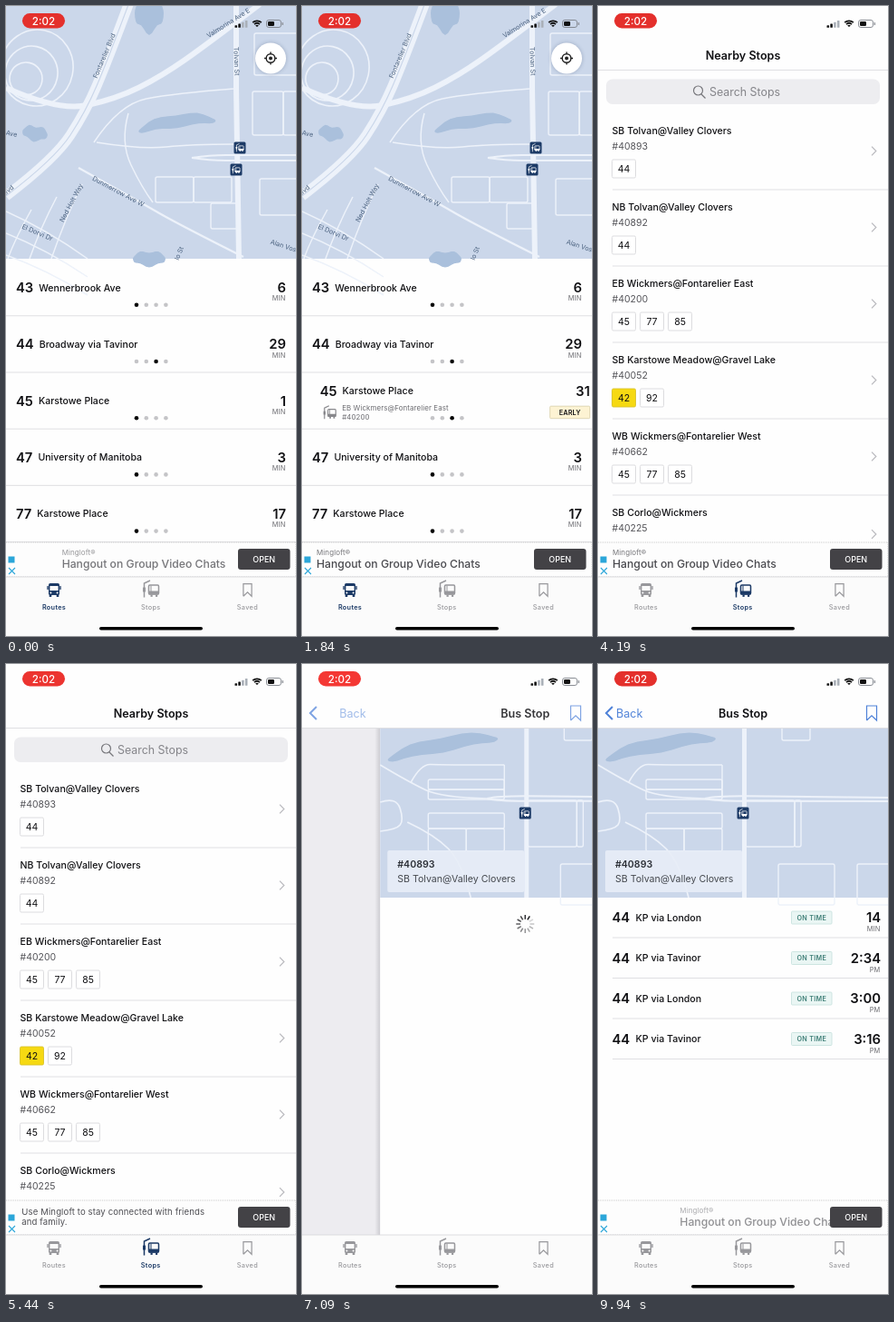
These frames come from a looping animation (320x693 px, 9990 ms). An HTML page with a canvas:

```html
<!DOCTYPE html>
<html lang="en">
<head>
<meta charset="utf-8">
<title>Transit app</title>
<style>
  html, body { margin: 0; width: 100%; height: 100%; overflow: hidden; background: #fff; }
  canvas { display: block; width: 320px; height: 693px; }
</style>
</head>
<body>
<canvas id="stage"></canvas>
<script>
const W = 320, H = 693, LOOP = 9990;
const canvas = document.getElementById('stage');
const g = canvas.getContext('2d');
const dpr = window.devicePixelRatio || 1;
canvas.width = W * dpr;
canvas.height = H * dpr;

const INK = '#111114', GREY = '#6b6b70', NAVY = '#1c3a66', BLUE = '#4f82d8', LINE = '#dcdcdf';
const LAND = '#cbd7ea', ROAD = '#edf2fa', WATER = '#aac0dc', MAPTEXT = '#4a617f';

const clamp = v => Math.max(0, Math.min(1, v));
const span = (t, a, b) => clamp((t - a) / (b - a));
const easeOut = p => 1 - (1 - p) ** 3;
const smooth = p => p * p * (3 - 2 * p);

// ---- drawing helpers ----
function text(s, x, y, size, { weight = 400, color = INK, align = 'left', space = 0 } = {}) {
  g.font = `${weight} ${size}px Inter, sans-serif`;
  g.letterSpacing = space + 'px';
  g.textAlign = align;
  g.textBaseline = 'alphabetic';
  g.fillStyle = color;
  g.fillText(s, x, y + size * 0.364);
  return g.measureText(s).width;
}

function box(x, y, w, h, r, fill, stroke, lw = 1) {
  g.beginPath();
  g.roundRect(x, y, w, h, r);
  if (fill) { g.fillStyle = fill; g.fill(); }
  if (stroke) { g.strokeStyle = stroke; g.lineWidth = lw; g.stroke(); }
}

function line(points, color, lw) {
  g.beginPath();
  for (let i = 0; i < points.length; i += 2) g.lineTo(points[i], points[i + 1]);
  g.strokeStyle = color;
  g.lineWidth = lw;
  g.stroke();
}

function circle(x, y, r, fill, stroke, lw) {
  g.beginPath();
  g.arc(x, y, r, 0, 7);
  if (fill) { g.fillStyle = fill; g.fill(); }
  if (stroke) { g.strokeStyle = stroke; g.lineWidth = lw; g.stroke(); }
}

function layer(draw, { x = 0, y = 0, alpha = 1, turn = 0, scale = 1, clip } = {}) {
  g.save();
  if (clip) { g.beginPath(); g.rect(...clip); g.clip(); }
  g.translate(x, y);
  g.rotate(turn * Math.PI / 180);
  g.scale(scale, scale);
  g.globalAlpha *= alpha;
  draw();
  g.restore();
}

// ---- icons ----
function busIcon(x, y, color) {
  layer(() => {
    box(-6, -7, 12, 13, 1.8, color);
    box(-4.6, -4, 9.2, 5, .5, '#fbfbfb');
    for (const side of [-1, 1]) {
      box(side * 7 - .7, -4, 1.4, 4, .5, color);
      box(side * 4 - 1.3, 5, 2.6, 3, .5, color);
      circle(side * 3.6, 3.4, 1, '#fbfbfb');
    }
  }, { x, y });
}

function stopIcon(x, y, color, scale = 1) {
  layer(() => {
    line([-7.5, 9, -7.5, -6.5, -1, -9.5], color, 1.5);
    box(-9, -2, 3, 5, .5, color);
    box(-2.5, -4.5, 11, 10, 1.2, null, color, 1.5);
    box(-2.5, 2, 11, 4, .5, color);
    line([0, -4, 0, 3], color, 1);
    for (const wheel of [-.5, 5]) box(wheel, 6, 2.2, 2.4, 0, color);
  }, { x, y, scale });
}

function bookmark(x, y, w, h, color) {
  line([x - w, y + h, x - w, y - h, x + w, y - h, x + w, y + h, x, y + h * .35, x - w, y + h], color, 1.2);
}

function chevron(x, y, dir, s, color, lw) {
  line([x, y - s, x + dir * s, y, x, y + s], color, lw);
}

// ---- map helpers ----
// Smooth road through the midpoints of a few key points.
function road(p, lw, color = ROAD) {
  g.beginPath();
  g.moveTo(p[0], p[1]);
  for (let i = 2; i < p.length - 2; i += 2) {
    const k = i < p.length - 4 ? .5 : 1;
    g.quadraticCurveTo(p[i], p[i + 1], p[i] + (p[i + 2] - p[i]) * k, p[i + 1] + (p[i + 3] - p[i + 1]) * k);
  }
  g.strokeStyle = color;
  g.lineWidth = lw;
  g.stroke();
}

// Bent lake: a lens along a shallow arc with a slightly uneven shore.
function lake(x, y, length, width, turn, bend = 0) {
  layer(() => {
    g.beginPath();
    for (let i = 0; i < 32; i++) {
      const a = i * Math.PI / 16, u = Math.cos(a);
      g.lineTo(u * length, Math.sin(a) * width * (1 + .2 * Math.sin(a * 5)) + bend * u * u);
    }
    g.fillStyle = WATER;
    g.fill();
  }, { x, y, turn });
}

// Rows of blocks sharing their sides.
function blocks(x, y, w, h, cols, rows) {
  for (let i = 0; i < cols * rows; i++)
    box(x + (i % cols) * w, y + Math.floor(i / cols) * h, w, h, 2, null, ROAD, 1.4);
}

function mapLabel(s, x, y, turn, size = 7.2) {
  layer(() => text(s, 0, 0, size, { color: MAPTEXT }), { x, y, turn });
}

function mapStop(x, y) {
  box(x - 6.5, y - 6.5, 13, 13, 1.5, NAVY);
  stopIcon(x, y, '#fff', .48);
}

// ---- shared chrome ----
function statusBar(t) {
  const pulse = Math.round(2 - 2 * Math.cos(t / 1000 * Math.PI)) / 4;
  box(18, 8, 47, 16.5, 8.2, `rgb(${228 + 16 * pulse},${48 + 8 * pulse},${44 + 8 * pulse})`);
  text('2:02', 41.5, 16.3, 11.6, { weight: 500, color: '#fff', align: 'center' });
  for (let i = 0; i < 4; i++) box(252.5 + i * 3.8, 21.3 - i * 1.8, 2.6, 2.5 + i * 1.8, .6, i < 2 ? '#111' : '#aab0b8');
  for (let i = 0; i < 3; i++) {
    g.beginPath();
    g.arc(277, 23.5, 1.8 + i * 2.7, -2.3, -.84);
    g.strokeStyle = '#111';
    g.lineWidth = 1.8;
    g.stroke();
  }
  box(287.5, 15.5, 16, 8, 2.4, null, '#7c8088', .9);
  box(289, 17, 7, 5, 1.2, '#111');
  box(304.7, 18, 1.3, 3, .6, '#8a8e95');
}

function tabBar(active) {
  g.fillStyle = '#fbfbfb';
  g.fillRect(0, 628, W, 65);
  line([0, 628, W, 628], '#d5d5d8', .8);
  const tint = i => i === active ? NAVY : '#98989c';
  busIcon(53, 642, tint(0));
  stopIcon(160, 641.5, tint(1));
  bookmark(266.5, 642.5, 4.6, 6.8, tint(2));
  ['Routes', 'Stops', 'Saved'].forEach((s, i) =>
    text(s, 53 + i * 106.7, 661, 7.3, { weight: i === active ? 600 : 500, color: tint(i), align: 'center', space: .3 }));
  box(103, 683, 114, 3.6, 1.8, '#000');
}

// ---- banner: the two messages swap every five seconds ----
function bannerText(which, x) {
  if (which === 0) {
    text('Mingloft®', x, 601, 8, { color: '#77777b', space: .1 });
    text('Hangout on Group Video Chats', x, 614, 12.2, { weight: 500, color: '#4a4a4f' });
  } else {
    text('Use Mingloft to stay connected with friends', x, 603, 9.6, { color: '#4d4d52', space: .1 });
    text('and family.', x, 614, 9.6, { color: '#4d4d52', space: .1 });
  }
}

function banner(t) {
  g.fillStyle = '#fdfdfd';
  g.fillRect(0, 590, W, 38);
  g.setLineDash([1, 1]);
  line([0, 590, W, 590, W, 628, 0, 628], '#bbb', .8);
  g.setLineDash([]);
  const phase = (t + 150) % 5000;
  const which = Math.floor((t + 150) / 5000) % 2;
  const leave = span(phase, 4850, 5000);
  const enter = 46 * Math.exp((150 - phase) / 123);
  const alpha = (1 - leave) * clamp(1 - enter / 190);
  layer(() => bannerText(which, 16 + enter - 120 * leave ** 2), { alpha, clip: [12, 591, 308, 36] });
  box(2.5, 605.5, 7, 7, 0, '#2ba6d9');
  for (const s of [-1, 1]) line([6.5 - 3.5 * s, 618, 6.5 + 3.5 * s, 625], '#2ba6d9', 1.1);
  box(256, 597, 57.5, 23, 3, '#434246');
  text('OPEN', 284.7, 608.3, 9, { weight: 500, color: '#fff', align: 'center' });
}

// ---- routes screen ----
function cityMap() {
  g.fillStyle = LAND;
  g.fillRect(0, 0, W, 278);
  lake(158, 8, 16, 20, 0);
  lake(188, 126, 43, 7, -8, 6);
  lake(32, 140, 14, 8, 10);
  lake(158, 278, 18, 8, 0);

  // interchange ramps
  for (let i = 0; i < 3; i++) {
    g.beginPath();
    g.ellipse(34 - i * 6, 68 + i * 6, 40 - i * 11, 42 - i * 12, .2, 0, 7);
    g.strokeStyle = ROAD;
    g.lineWidth = 1.6;
    g.stroke();
  }
  // side streets south of the main road
  for (let i = 0; i < 3; i++) {
    road([84 - i * 28, 196 + i * 14, 66 - i * 28, 232 + i * 12, 50 - i * 24, 278], 1.5);
    road([0, 226 + i * 24, 45, 246 + i * 22, 90, 278 + i * 20], 1.5);
  }
  // neighbourhood crescents
  road([97, 150, 125, 108, 185, 96, 252, 91], 1.5);
  road([100, 150, 150, 158, 204, 152, 252, 152], 1.5);
  road([135, 118, 126, 150, 150, 200, 162, 216], 1.5);
  blocks(165, 188, 42, 28, 2, 1);
  blocks(272, 94, 34, 48, 2, 1);
  blocks(280, 190, 60, 40, 1, 1);
  blocks(274, 30, 60, 46, 1, 1);
  blocks(226, 217, 30, 28, 1, 1);

  road([80, 178, 145, 214, 190, 240, 262, 276], 2.2);
  for (const side of [-1, 1]) road([205, 167, 225, 167 + side * 3, 260, 167 + side * 3, W, 167 + side * 3], 2);
  road([0, 90, 58, 116, 122, 102, 172, 77, 222, 42, 280, -2], 6);
  const avenue = [136, -4, 112, 60, 88, 116, 54, 168, 0, 209];
  road(avenue, 11);
  road(avenue, 1.2, LAND);
  line([254, 0, 254, 90, 257, 278], ROAD, 6);

  mapLabel('Fontarelier Blvd', 98, 79, -67);
  mapLabel('Valmorina Ave E', 222, 33, -32);
  mapLabel('Tolvan St', 254, 45, 88);
  mapLabel('Dunmerrow Ave W', 96, 189, 28);
  mapLabel('Ned Holt Way', 61, 237, -62);
  mapLabel('El Dorvi Dr', 18, 242, 23);
  mapLabel('Blvd', -4, 208, -40);
  mapLabel('Ave', 0, 139, 12);
  mapLabel('lo St', 188, 279, -68);
  mapLabel('Alan Vostrel', 292, 259, 18);
  mapStop(258, 156);
  mapStop(254, 180);

  layer(() => {
    g.shadowColor = 'rgba(40,60,100,.3)';
    g.shadowBlur = 4 * dpr;
    circle(0, 0, 17, '#fff');
  }, { x: 292, y: 57.5 });
  circle(292, 57.5, 4.8, null, '#222', 1.4);
  circle(292, 57.5, 2, '#222');
  for (let i = 0; i < 4; i++) layer(() => line([5, 0, 7, 0], '#222', 1.4), { x: 292, y: 57.5, turn: i * 90 });
}

const routes = [
  { num: '43', name: 'Wennerbrook Ave', mins: '6' },
  { num: '44', name: 'Broadway via Tavinor', mins: '29', page: 2 },
  { num: '45', name: 'Karstowe Place', mins: '1', swiped: true },
  { num: '47', name: 'University of Manitoba', mins: '3' },
  { num: '77', name: 'Karstowe Place', mins: '17' }
];

function routeRow({ num, name, mins }, y, open) {
  const top = y - 11 * open;
  const w = text(num, 11, top, 14.8, { weight: 600 });
  text(name, 17 + w, top, 10.6, { weight: 500 });
  text(mins, 309, top, 14.8, { weight: 600, align: 'right' });
  layer(() => text('MIN', 308.5, y + 12, 7.4, { color: GREY, align: 'right', space: .2 }), { alpha: 1 - open });
  layer(() => {
    stopIcon(22, y + 13, '#88888c', .78);
    text('EB Wickmers@Fontarelier East', 35.5, y + 8, 7.9, { color: GREY, space: .1 });
    text('#40200', 35.5, y + 18, 7.9, { color: GREY, space: .1 });
    box(265, y + 6, 44, 13.5, 1, '#fdf3d3', '#d9cfa8', .8);
    text('EARLY', 287, y + 12.8, 7.2, { weight: 600, align: 'center', space: .2 });
  }, { alpha: open });
}

function routesScreen(t) {
  cityMap();
  const open = smooth(span(t, 40, 340));
  const swipe = easeOut(span(t, 1090, 1440)) + easeOut(span(t, 1610, 1940));
  routes.forEach((row, i) => {
    const y = 309.8 + i * 62.2;
    const page = row.swiped ? swipe : row.page || 0;
    if (row.swiped) {
      for (let k = 0; k < 3; k++)
        layer(() => routeRow({ ...row, mins: 1 + 15 * k }, y, open), { x: (k - swipe) * W });
    } else routeRow(row, y, 0);
    for (let k = 0; k < 4; k++) circle(144 + k * 10.8, y + 19, 2.3, k === Math.round(page) ? '#000' : '#c4c4c7');
    line([0, y + 31, W, y + 31], LINE, .9);
  });
}

// ---- stops screen ----
const stops = [
  ['SB Tolvan@Valley Clovers', '#40893', '44'],
  ['NB Tolvan@Valley Clovers', '#40892', '44'],
  ['EB Wickmers@Fontarelier East', '#40200', '45 77 85'],
  ['SB Karstowe Meadow@Gravel Lake', '#40052', '42 92'],
  ['WB Wickmers@Fontarelier West', '#40662', '45 77 85'],
  ['SB Corlo@Wickmers', '#40225', '']
];

function chip(label, x, y) {
  const hot = label === '42';
  box(x, y, 26, 20, 1.5, hot ? '#f6d912' : '#fff', hot ? '#d9c22a' : '#d9d9dc', .9);
  text(label, x + 13, y + 10, 10.5, { align: 'center' });
}

function stopsList(t) {
  box(9, 80.5, 302, 27.5, 7, '#ededf0');
  circle(110.5, 93, 5, null, '#77777c', 1.2);
  line([114, 97, 118.5, 101.5], '#77777c', 1.3);
  text('Search Stops', 123, 94.5, 12.4, { color: '#85858a' });
  g.fillStyle = `rgba(216,216,220,${span(t, 6690, 6760)})`;
  g.fillRect(0, 118, W, 84);
  let y = 137;
  stops.forEach(([name, id, lines], i) => {
    const ready = lines && t >= 2735 + i * 55 - 55 * (i === 0);
    const h = ready ? 84 : 87;
    text(name, 15.5, y, 10.6, { weight: 500 });
    text(id, 15.5, y + 17, 10.5, { color: '#55555a' });
    if (ready) lines.split(' ').forEach((s, k) => chip(s, 15.5 + k * 31, y + 32));
    else for (let k = 0; k < 3; k++) box(15.5 + k * 31, y + 34.5, 26.5, 20.5, 1.5, '#eeedf0');
    chevron(302, y + h / 2 - 19.5, 1, 4.8, '#b9b9be', 1.2);
    line([16, y + h - 19, W, y + h - 19], LINE, .9);
    y += h;
  });
}

// ---- stop detail ----
const departures = [
  ['London', '14', 'MIN'], ['Tavinor', '2:34', 'PM'], ['London', '3:00', 'PM'], ['Tavinor', '3:16', 'PM']
];

function stopMap() {
  g.fillStyle = LAND;
  g.fillRect(0, 71, W, 186);
  lake(68, 88, 62, 8, -11, 6);
  road([0, 111, 32, 130, 68, 147, 118, 148], 1.7);
  road([34, 130, 45, 110, 66, 111, 137, 111], 1.7);
  road([0, 152, 18, 146, 26, 172, 18, 182, 0, 184], 1.7);
  road([30, 174, 60, 188, 90, 218, 100, 257], 1.7);
  blocks(53, 127, 84, 11, 1, 2);
  blocks(53, 164, 84, 17, 1, 1);
  blocks(53, 181, 42, 25, 2, 1);
  blocks(163, 150, 54, 51, 1, 1);
  blocks(217, 150, 7, 51, 1, 1);
  blocks(203, 60, 31, 24, 1, 1);
  blocks(199, 220, 62, 45, 1, 1);
  blocks(286, 220, 50, 45, 1, 1);
  line([137, 111, 137, 146], ROAD, 1.4);
  for (const side of [-1, 1]) road([118, 148, 130, 148 + side * 3, 200, 148 + side * 2.5, W, 149 + side * 2], 2);
  line([161.5, 71, 161.5, 257], ROAD, 5);
  mapStop(160, 164);
  box(8, 205, 151, 46, 2, 'rgba(232,238,248,.9)');
  text('#40893', 19, 220, 10.6, { weight: 600, color: '#2b2f36' });
  text('SB Tolvan@Valley Clovers', 19, 236, 10.6, { color: '#45494f' });
}

function spinner(t) {
  const head = Math.floor(t / 83) + 9;
  for (let i = 0; i < 12; i++) {
    const age = (head - i) % 12;
    layer(() => line([5.2, 0, 10, 0], '#1e1e22', 1.5), { x: 160, y: 286, turn: i * 30, alpha: 1 - age * .075 });
  }
}

function departureRow([via, time, unit], i) {
  const y = 279 + i * 44.5;
  text('44', 15.5, y, 14.8, { weight: 600 });
  text('KP via ' + via, 41.5, y, 10.6, { weight: 500 });
  box(213.5, y - 7, 44.5, 14, 1, '#eaf6f4', '#c5e0dc', .8);
  text('ON TIME', 235.8, y + .2, 7.2, { weight: 600, color: '#3f7f77', align: 'center', space: .3 });
  text(time, 312, y, 14.8, { weight: 600, align: 'right' });
  text(unit, 311.5, y + 12.5, 7.4, { color: GREY, align: 'right', space: .2 });
  line([16, y + 22, W, y + 22], LINE, .9);
}

function detailPage(t) {
  g.fillStyle = '#fefefe';
  g.fillRect(0, 71, W, 557);
  stopMap();
  if (t < 7645) spinner(t);
  else departures.forEach(departureRow);
}

function stopsScreen(t) {
  const p = easeOut(span(t, 6914, 7414));
  const off = W * (1 - p);
  const body = [0, 71, W, 557];
  if (p < 1) {
    layer(() => stopsList(t), { x: -96 * p, clip: body });
    g.fillStyle = `rgba(237,236,240,${clamp(p * 2)})`;
    g.fillRect(...body);
  }
  if (p > 0) {
    const shade = g.createLinearGradient(off - 6, 0, off, 0);
    shade.addColorStop(0, 'rgba(90,90,100,0)');
    shade.addColorStop(1, 'rgba(90,90,100,.22)');
    g.fillStyle = shade;
    g.fillRect(off - 6, 71, 6, 557);
    layer(() => detailPage(t), { x: off, clip: body });
  }
  line([0, 70.5, W, 70.5], LINE, .9);
  const title = { weight: 600, align: 'center' };
  layer(() => text('Nearby Stops', 160 - 120 * p, 54.5, 12.6, title), { alpha: clamp(1 - p * 1.5) });
  layer(() => text('Bus Stop', 160 + off, 54.5, 12.6, title), { alpha: clamp(p * 1.15) });
  layer(() => {
    chevron(16, 54, -1, 7, BLUE, 2);
    bookmark(302, 54, 5.5, 8, BLUE);
  }, { alpha: p });
  layer(() => text('Back', 20 + off * .245, 54.5, 12.6, { color: BLUE }), { alpha: p * p });
}

function draw(t) {
  g.setTransform(dpr, 0, 0, dpr, 0, 0);
  g.fillStyle = '#fefefe';
  g.fillRect(0, 0, W, H);
  const onRoutes = t < 2690, pushed = t >= 6914;
  if (onRoutes) routesScreen(t);
  else stopsScreen(t);
  const shown = pushed ? span(t, 7740, 7890) : 1;
  if (shown > 0) layer(() => banner(t), { alpha: shown });
  tabBar(onRoutes ? 0 : pushed ? -1 : 1);
  statusBar(t);
}

const start = performance.now();
function tick() {
  draw((performance.now() - start) % LOOP);
  requestAnimationFrame(tick);
}
tick();
</script>
</body>
</html>
```
